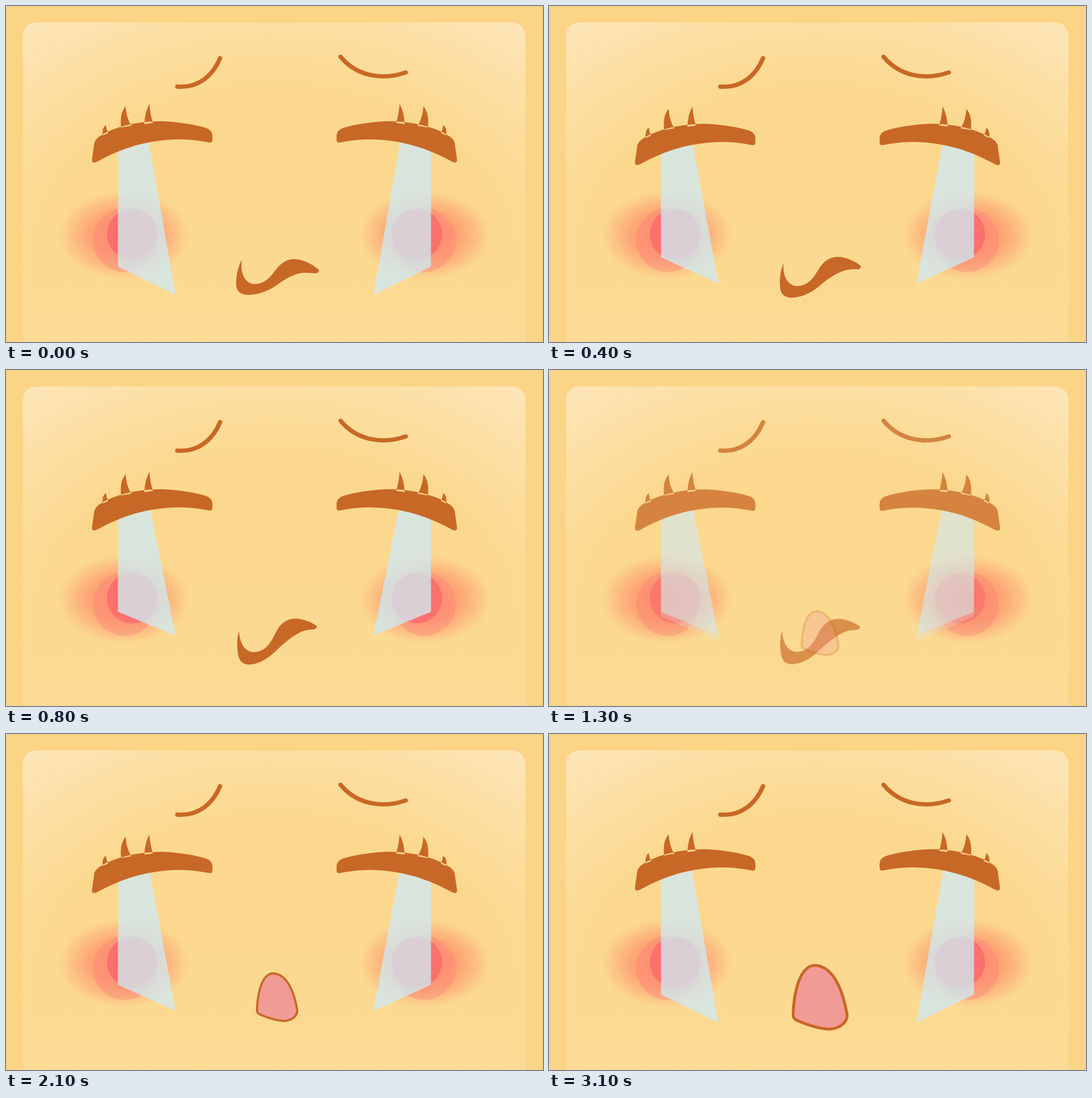
Animation of 947 by 592 pixels, one loop 4600 ms. Source, as an HTML page:

```html
<!DOCTYPE html>
<html lang="en">
<head>
<meta charset="utf-8">
<title>Crying face</title>
<style>
  html, body { margin: 0; width: 100%; height: 100%; overflow: hidden; background: #fbd486; }
  svg { display: block; width: 947px; height: 592px; }
  .brown { fill: #c86826; }
  .brow { fill: none; stroke: #c86826; stroke-width: 7.5; stroke-linecap: round; }
  .tear { fill: #d1e8f1; fill-opacity: .79; }
  .outer { fill: #f77878; fill-opacity: .33; }
  .inner { fill: #fa696c; fill-opacity: .8; }
  .open { fill: #f09b96; stroke: #c86826; stroke-width: 3.5; stroke-linejoin: round; }
</style>
</head>
<body>
<svg viewBox="0 0 947 592">
  <defs>
    <linearGradient id="skin" x1="0" y1="0" x2="0" y2="1">
      <stop offset=".4" stop-color="#fbd88d"/>
      <stop offset="1" stop-color="#fbda94"/>
    </linearGradient>
    <radialGradient id="shine" gradientUnits="userSpaceOnUse" cx="0" cy="0" r="1"
      gradientTransform="translate(473 480) scale(732 566)">
      <stop offset=".58" stop-color="#fde6b9" stop-opacity="0"/>
      <stop offset=".8" stop-color="#fde6b9" stop-opacity=".5"/>
      <stop offset="1" stop-color="#fde6b9"/>
    </radialGradient>
    <radialGradient id="blush">
      <stop offset="0" stop-color="#ff8c68" stop-opacity=".95"/>
      <stop offset=".55" stop-color="#ff8c68" stop-opacity=".65"/>
      <stop offset=".8" stop-color="#ff8c68" stop-opacity=".3"/>
      <stop offset="1" stop-color="#ff8c68" stop-opacity="0"/>
    </radialGradient>
  </defs>
  <rect width="947" height="592" fill="#fbd486"/>
  <rect id="panel" x="30" y="29" width="886" height="640" rx="23" fill="url(#skin)"/>
  <rect x="30" y="29" width="886" height="640" rx="23" fill="url(#shine)"/>
  <ellipse cx="208" cy="404" rx="115" ry="78" fill="url(#blush)"/>
  <ellipse cx="739" cy="404" rx="115" ry="78" fill="url(#blush)"/>
  <g id="sad"></g>
  <g id="wail"></g>
</svg>
<script>
const LOOP = 4600;
const $ = id => document.getElementById(id);

const LID = 'M151.5 271L155.5 243Q156 237 163 231Q170 226 178 222C207 209 240 203 275 203' +
  'C305 204 333 209 353 215Q364 219 364 229L364 236Q364 241.5 358 240.5C335 236 318 235 303 235' +
  'C255 236 210 247 162 273.5Q152 279 151.5 271Z';
const LASHES = 'M253 172.5Q245 186 244 208L259 206Q254 190 253 172.5Z' +
  'M211 176.5Q200 189 203 214L221 211Q212 197 211 176.5Z' +
  'M176 210Q169 214 170.5 228L180 224Q177 217 176 210Z';

// The closed mouth bends between these two shapes.
const FLAT = 'M416 447C411 455 405 473 406 492C407 504 415 509 428 509C452 508 470 498 484 487' +
  'C500 477 512 471 525 470C533 470 540 470 547 471Q553 469 552 465C545 458 527 447 510 446' +
  'C494 445 484 454 474 467C465 479 455 490 438 490C424 489 412 475 416 447Z';
const BENT = 'M411 460C407 470 407 486 409 499C411 514 418 519 430 519C452 517 467 504 481 490' +
  'C497 475 509 467 521 461C529 458 537 457 543 457Q549 455 548 451C540 445 525 438 510 438' +
  'C494 438 483 448 476 462C468 478 459 497 436 497C420 496 412 480 411 460Z';
const OPEN = 'M471.5 425C455 426 447 452 445.5 483Q445 489 450 491.5C463 497 478 502 490 502' +
  'C504 501 511.5 492 510.5 484C505 452 493 426 471.5 425Z';

const bentTo = BENT.match(/[\d.]+/g).map(Number);
function mouthPath(t) {
  let i = 0;
  return FLAT.replace(/[\d.]+/g, n => (+n + (bentTo[i++] - n) * t).toFixed(2));
}

function buildFace(id, mouth) {
  const half = `${id}-half`;
  $(id).innerHTML = `
    <path class="brow" d="M302 142C338 145 364 124 377.5 92"/>
    <path class="brow" d="M590 89.5C618 123 662 132 705 117"/>
    <g id="${half}">
      <circle class="outer" cx="209.5" cy="412.5" r="56"/>
      <circle class="inner" cx="222.5" cy="402" r="44.5"/>
      <polygon class="tear"/>
      <path class="brown lid" d="${LID}${LASHES}"/>
    </g>
    <use href="#${half}" transform="matrix(-1 0 0 1 947 0)"/>
    <path class="mouth ${mouth}" d="${mouth === 'open' ? OPEN : FLAT}"/>`;
  const find = s => $(id).querySelector(s);
  return { group: $(id), tear: find('.tear'), lid: find('.lid'), mouth: find('.mouth') };
}

const sad = buildFace('sad', 'brown');
const wail = buildFace('wail', 'open');

function pose(face, opacity, drop, shrink) {
  face.group.setAttribute('opacity', opacity);
  face.group.setAttribute('display', opacity ? 'inline' : 'none');
  face.lid.setAttribute('transform', `translate(0 ${drop})`);
  face.tear.setAttribute('points',
    `197.5,${235 + drop} ${251 + drop * .35},${235 + drop * .7} ` +
    `299,${509 - 41 * shrink} 197.5,${459 - 33 * shrink}`);
}
function poseSad(opacity, drop, shrink, bend) {
  pose(sad, opacity, drop, shrink);
  sad.mouth.setAttribute('d', mouthPath(bend));
}
function poseWail(opacity, drop, shrink, size) {
  pose(wail, opacity, drop, shrink);
  wail.mouth.setAttribute('transform', `translate(478 463) scale(${size}) translate(-478 -463)`);
}

// Each step: start time, then opacity, lid drop, tear shrink and mouth bend or size.
const OFF = [0, 0, 0, 1];
const STEPS = [
  [0, [1, 0, 0, 0], OFF],
  [200, [1, 2.3, .25, .25], OFF],
  [400, [1, 4.6, .49, .5], OFF],
  [600, [1, 7, .75, .75], OFF],
  [800, [1, 7, 1, 1], OFF],
  [1300, [.65, 7.5, 1, .94], [.3, 7, .75, 1]],
  [1600, OFF, [1, 7, .75, 1]],
  [2100, OFF, [1, 4.6, .52, 1.09]],
  [2600, OFF, [1, 2.3, .32, 1.045]],
  [3100, OFF, [1, 0, 0, 1.46]]
];

let shown;
function draw(now) {
  const t = now % LOOP;
  const step = STEPS.findLast(s => s[0] <= t);
  if (step !== shown) {
    shown = step;
    poseSad(...step[1]);
    poseWail(...step[2]);
  }
}
function tick() {
  draw(performance.now() - start);
  requestAnimationFrame(tick);
}
const start = performance.now();
tick();
</script>
</body>
</html>
```
